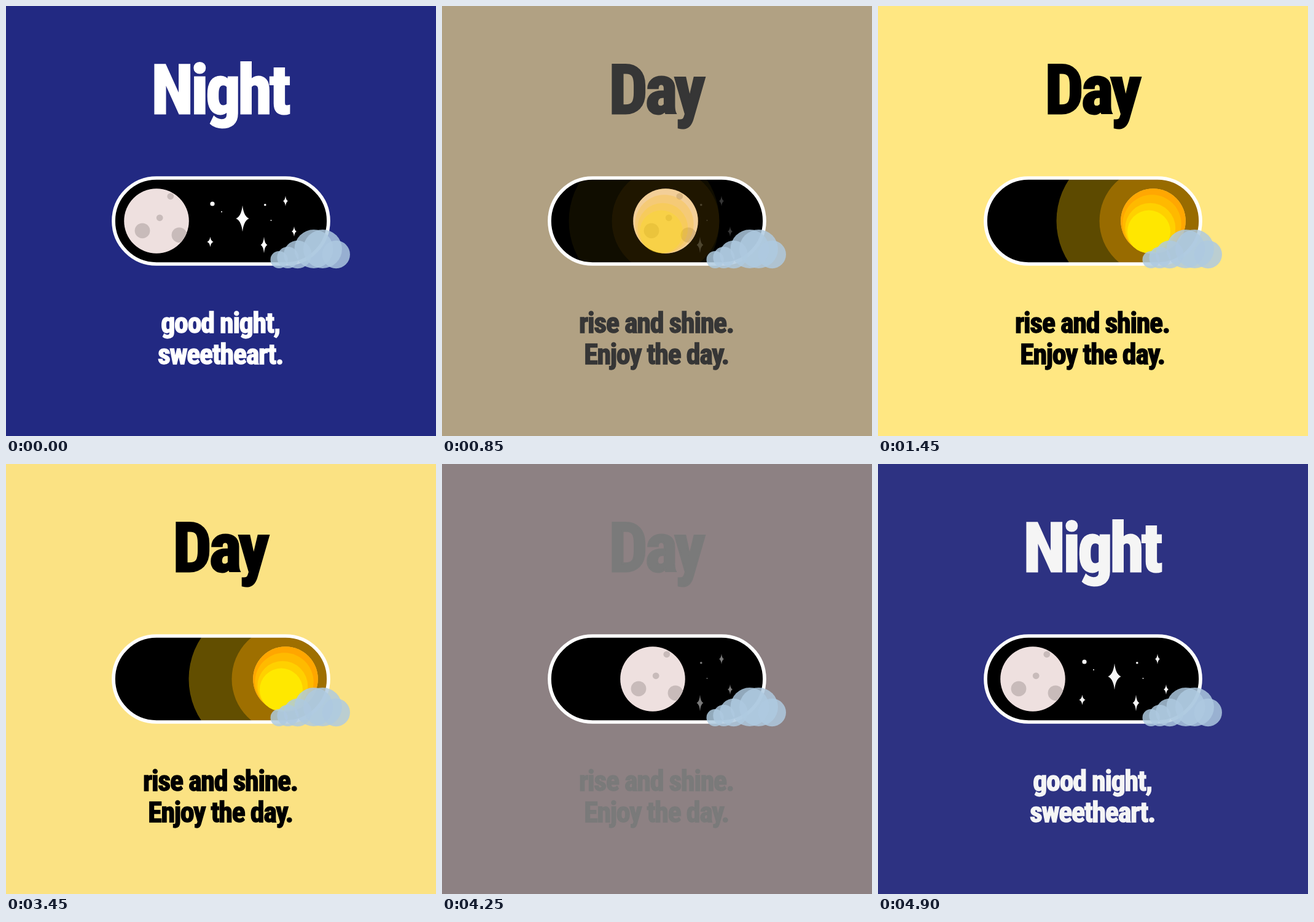
Write an HTML page that moves like this. It is 700 px wide and 700 px high and loops after 6900 ms.

```html
<!DOCTYPE html>
<html lang="en">
<head>
<meta charset="utf-8">
<title>Night and day</title>
<style>
html, body { margin: 0; width: 100%; height: 100%; overflow: hidden; }
svg { display: block; width: 100vw; height: 100vh; }
svg, .disc, .glow circle, .sun circle, .night, .day { animation: 6900ms infinite; }

/* Everything advances in 50 ms ticks, 29 each way, with a rest at both ends. */
svg { animation-name: sky, ink; }
.disc { animation-name: slide; }
.glow circle { animation-name: glow; }
.sun circle { animation-name: sun; }
.night { animation-name: night; }
.day { animation-name: day; }

@keyframes slide {
  0% { transform: translateX(0); animation-timing-function: steps(29); }
  21.014% { transform: translateX(203px); animation-timing-function: step-end; }
  50% { transform: translateX(210px); animation-timing-function: steps(29); }
  71.014%, 100% { transform: translateX(7px); animation-timing-function: step-end; }
}
@keyframes sky {
  0% { background-color: #222982; animation-timing-function: steps(11); }
  7.971% { background-color: #867c84; animation-timing-function: steps(10); }
  15.217% { background-color: #cdb983; animation-timing-function: steps(8); }
  21.014% { background-color: #ffe782; animation-timing-function: step-end; }
  50% { background-color: #fbe283; animation-timing-function: steps(16); }
  61.594% { background-color: #8d8183; animation-timing-function: steps(13); }
  71.014%, 100% { background-color: #2d3282; animation-timing-function: step-end; }
}
@keyframes ink {
  0% { color: #fff; animation-timing-function: steps(11); }
  7.971% { color: #868686; animation-timing-function: steps(10); }
  15.217%, 50% { color: #000; animation-timing-function: step-end; }
  52.173% { color: #000; animation-timing-function: steps(13); }
  61.594% { color: #7a7a7a; animation-timing-function: steps(13); }
  71.014%, 100% { color: #f5f5f5; animation-timing-function: step-end; }
}
@keyframes glow {
  0% { opacity: 0; animation-timing-function: step-end; }
  10.869% { opacity: 0; animation-timing-function: steps(6); }
  15.217% { opacity: .19; animation-timing-function: steps(8); }
  21.014% { opacity: .365; animation-timing-function: step-end; }
  50% { opacity: .385; animation-timing-function: steps(9); }
  56.521% { opacity: .19; animation-timing-function: steps(6); }
  60.869%, 100% { opacity: 0; }
}
@keyframes sun {
  0% { opacity: 0; animation-timing-function: step-end; }
  10.869% { opacity: 0; animation-timing-function: steps(6); }
  15.217% { opacity: .65; animation-timing-function: steps(8); }
  21.014% { opacity: .98; animation-timing-function: step-end; }
  50% { opacity: 1; animation-timing-function: steps(9); }
  56.521% { opacity: .65; animation-timing-function: steps(6); }
  60.869%, 100% { opacity: 0; }
}
@keyframes night {
  0%, 62.318%, 100% { visibility: visible; animation-timing-function: step-end; }
  10.869% { visibility: hidden; animation-timing-function: step-end; }
}
@keyframes day {
  0%, 62.318%, 100% { visibility: hidden; animation-timing-function: step-end; }
  10.869% { visibility: visible; animation-timing-function: step-end; }
}

text {
  font: 900 46px "Roboto Condensed", "Liberation Sans Narrow", "Open Sans Condensed", Roboto, sans-serif;
  font-stretch: condensed;
  text-anchor: middle;
  fill: currentColor;
  stroke: currentColor;
  stroke-width: 1.4;
  letter-spacing: -1.3px;
}
.title { font-size: 112px; stroke-width: 3; letter-spacing: -4px; }
.stars { fill: currentColor; }
.cloud { fill: #aecae0; fill-opacity: .84; }
</style>
</head>
<body>
<svg viewBox="0 0 700 700">
  <defs>
    <clipPath id="pill"><rect x="175" y="280" width="350" height="140" rx="70"/></clipPath>
    <clipPath id="face"><circle cx="245" cy="350" r="52.8"/></clipPath>
    <path id="star" d="M0-1Q.18-.18 1 0Q.18.18 0 1Q-.18.18-1 0Q-.18-.18 0-1Z"/>
  </defs>

  <g class="night">
    <text class="title" x="348" y="175">Night</text>
    <text x="349" y="532">good night,</text>
    <text x="349" y="583">sweetheart.</text>
  </g>
  <g class="day">
    <text class="title" x="348" y="175">Day</text>
    <text x="349" y="532">rise and shine.</text>
    <text x="349" y="583">Enjoy the day.</text>
  </g>

  <g clip-path="url(#pill)">
    <rect x="175" y="280" width="350" height="140"/>
    <g class="stars">
      <use href="#star" transform="translate(385 346) scale(10.5 21.5)"/>
      <use href="#star" transform="translate(420 389) scale(5.3 13.3)"/>
      <use href="#star" transform="translate(332.5 384) scale(5.2 8.2)"/>
      <use href="#star" transform="translate(455 317.5) scale(4 8.5)"/>
      <use href="#star" transform="translate(469 367) scale(4 8.3)"/>
      <circle cx="336" cy="322" r="3.6"/>
      <circle cx="351" cy="335" r="1"/>
      <circle cx="421.8" cy="323.8" r="1.8"/>
      <circle cx="431.5" cy="349" r=".9"/>
    </g>
    <g class="disc">
      <circle cx="245" cy="350" r="52.8" fill="#eee0df"/>
      <g clip-path="url(#face)" fill="#c8bbba">
        <circle cx="267.8" cy="309.8" r="5.4"/>
        <circle cx="250.2" cy="344.8" r="5.4"/>
        <circle cx="222" cy="365.8" r="12.4"/>
        <circle cx="282" cy="372.8" r="12.4"/>
      </g>
      <g class="glow">
        <circle cx="210" cy="350" r="122.5" fill="#ffcc00"/>
        <circle cx="245" cy="350" r="87.5" fill="#ffa500"/>
      </g>
      <g class="sun">
        <circle cx="245" cy="350" r="52.8" fill="#ffa600"/>
        <circle cx="243" cy="355" r="47.7" fill="#ffba00"/>
        <circle cx="240.3" cy="361.7" r="41" fill="#ffd000"/>
        <circle cx="238" cy="367.5" r="35" fill="#ffe800"/>
      </g>
    </g>
  </g>
  <rect x="175" y="280" width="350" height="140" rx="70" fill="none" stroke="#fff" stroke-width="5.7"/>

  <g class="cloud">
    <circle cx="444.5" cy="413" r="14"/>
    <circle cx="458.8" cy="409.5" r="17.5"/>
    <circle cx="474.8" cy="404.5" r="22.7"/>
    <circle cx="501" cy="395.5" r="31.5"/>
    <circle cx="515.5" cy="395.5" r="31.5"/>
    <circle cx="537.3" cy="404.5" r="22.7"/>
  </g>
</svg>
</body>
</html>
```
